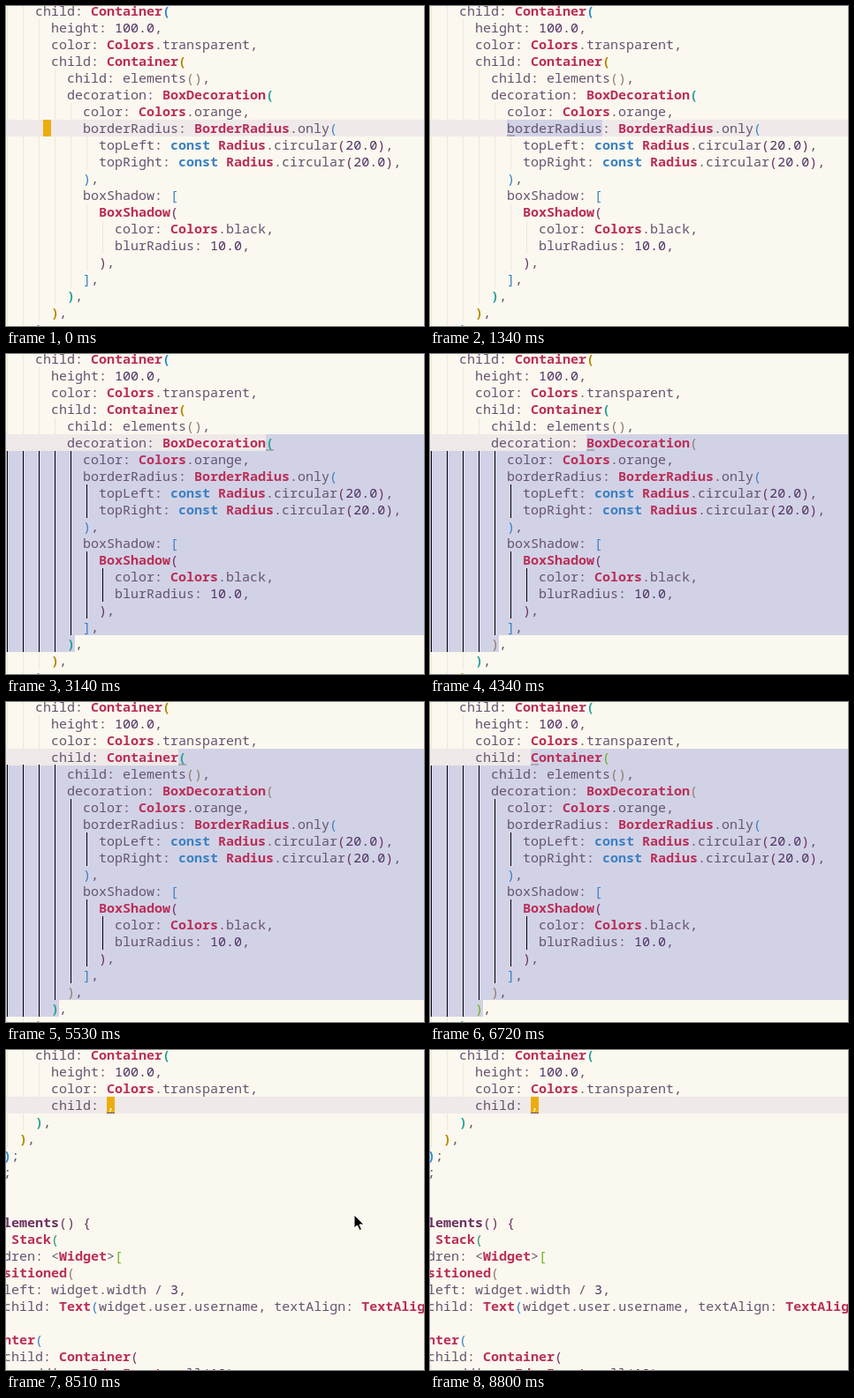
Animation, 473 px wide and 363 px high, one loop 9400 ms. Source, as an HTML page:

```html
<!DOCTYPE html>
<html lang="en">
<head>
<meta charset="utf-8">
<title>Expanding selection in a code editor</title>
<style>
html, body { margin: 0; width: 100%; height: 100%; overflow: hidden; background: #fbf8ef; }
#stage { position: relative; width: 473px; height: 363px; overflow: hidden; background: #fbf8ef; }
#stage div { position: absolute; }
.line { font: 15px/19px "Noto Sans Mono", "Liberation Mono", monospace; height: 19px;
  white-space: pre; color: #655370; font-variant-ligatures: none; }
.type { color: #ba2f59; font-weight: 700; }
.key { color: #3a81c3; font-weight: 700; }
.func { color: #6c3163; font-weight: 700; }
.num { color: #4e3163; }
.hot { font-weight: 700; }
.match { color: #ba2f59; font-weight: 700; text-decoration: underline; }
svg { position: absolute; left: 0; top: 0; }
</style>
</head>
<body>
<div id="stage"></div>
<script>
const LOOP = 9400, W = 473, ROW = 19, TOP = -4;
const HL = "#efeae9", REGION = "#d2d2e6", CURSOR = "#eead0e", BAR = "#a9a9ae", GUIDE = "#efe8d0";
const DEPTH = ["", "#3a81c3", "#6c3163", "#2d9574", "#67b11d", "#8f7a6c", "#3a81c3", "#6c3163"];
const HOT = ["#2aa198", "#b58900", "#268bd2"];

// Each line: left edge of its first character, then text.
const before = { depth: 3, lines: [
  [33, "child: Container("],
  [51, "height: 100.0,"],
  [51, "color: Colors.transparent,"],
  [51, "child: Container("],
  [69, "child: elements(),"],
  [69, "decoration: BoxDecoration("],
  [87, "color: Colors.orange,"],
  [87, "borderRadius: BorderRadius.only("],
  [105, "topLeft: const Radius.circular(20.0),"],
  [105, "topRight: const Radius.circular(20.0),"],
  [87, "),"],
  [87, "boxShadow: ["],
  [105, "BoxShadow("],
  [123, "color: Colors.black,"],
  [123, "blurRadius: 10.0,"],
  [105, "),"],
  [87, "],"],
  [69, "),"],
  [51, "),"],
  [33, "),"]
] };
// The listing above holds one line more than fits between rows 12 and 15.
const after = { depth: 4, lines: [
  ...before.lines.slice(0, 3),
  [51, "child: ,"],
  [33, "),"],
  [15, "),"],
  [-3, ");"],
  [-3, ";"],
  [0, ""],
  [0, ""],
  [-12, "elements() {"],
  [-57, "return Stack("],
  [-39, "children: <Widget>["],
  [-21, "Positioned("],
  [-3, "left: widget.width / 3,"],
  [-3, "child: Text(widget.user.username, textAlign: TextAlign.center),"],
  [0, ""],
  [-21, "Center("],
  [-3, "child: Container("],
  [15, "padding: EdgeInsets.all(10),"]
] };

// sel: [x, row, endX, endRow]; hot: enclosing bracket pairs, innermost first.
const steps = [
  [0, { doc: before, row: 7, block: 42, hot: [3, 1, 0] }],
  [1340, { block: null, sel: [87, 7, 195, 7] }],
  [2090, { sel: [87, 6, 105, 16], stub: true }],
  [2240, { stub: false }],
  [3140, { sel: [294, 5, 78, 17] }],
  [3290, { hot: [1, 0, -1], match: 3 }],
  [3890, { sel: [177, 5, 78, 17], stub: true }],
  [4190, { match: null }],
  [4340, { stub: false }],
  [4630, { sel: [69, 4, 87, 17], stub: true }],
  [4780, { stub: false }],
  [5530, { sel: [195, 3, 60, 18], stub: true }],
  [5680, { stub: false }],
  [5820, { hot: [0, -1, -2], match: 1 }],
  [6270, { sel: [114, 3, 60, 18], stub: true }],
  [6420, { stub: false }],
  [6570, { match: null, stub: true }],
  [6720, { stub: false }],
  [8060, { doc: after, row: 3, sel: null, block: 114 }],
  [8210, { under: true }],
  [8510, { pointer: "arrow" }],
  [8650, { pointer: "beam" }],
  [8800, { pointer: null }]
];
const states = [];
steps.reduce((s, [, change]) => {
  const next = { ...s, ...change };
  states.push(next);
  return next;
}, {});

const POINTERS = {
  arrow: '<path d="M394 187V202L397.5 199L400 204.5L402.5 203.5L400 198H405Z" fill="#000" stroke="#fff"/>',
  beam: '<path d="M428.5 315.5Q431.5 315.5 431.5 318V328Q431.5 330.5 428.5 330.5M434.5 315.5Q431.5 315.5 431.5 318M431.5 328Q431.5 330.5 434.5 330.5" fill="none" stroke="#333"/>'
};

const stage = document.getElementById("stage");
const y = row => TOP + row * ROW;

function rect(x, top, w, h, color) {
  const d = document.createElement("div");
  d.style.cssText = `left:${x}px;top:${top}px;width:${w}px;height:${h}px;background:${color}`;
  stage.append(d);
}

function span(parent, text, cls, color) {
  const s = document.createElement("span");
  s.textContent = text;
  if (cls) s.className = cls;
  if (color) s.style.color = color;
  parent.append(s);
}

function drawGuides(s, first, last) {
  s.doc.lines.forEach(([indent, text], row) => {
    if (row === first || !text) return;
    const dark = s.sel && row > first && row <= last;
    for (let x = -3; x < indent; x += 18) rect(x + 4, y(row), 1, ROW, dark ? "#000" : GUIDE);
  });
  if (s.stub) {
    const indent = s.doc.lines[first + 1][0];
    for (let x = -3; x < indent; x += 18) rect(x + 4, y(first + 1) - 1, 1, 1, "#000");
  }
}

function drawText(s) {
  const open = [-2, -1];
  let id = 0;
  s.doc.lines.forEach(([x, text], row) => {
    const line = document.createElement("div");
    line.className = "line";
    line.style.left = x + "px";
    line.style.top = y(row) + "px";
    const tokens = text.match(/\bconst\b|elements(?=\(\) \{)|\b[A-Z]\w*|\b\d+(?:\.\d+)?|[()[\]{}]|\w+|[^\w()[\]{}]+/g) || [];
    for (const t of tokens) {
      if (/[()[\]{}]/.test(t)) {
        if (/[([{]/.test(t)) open.push(id++);
        const pair = open[open.length - 1];
        const depth = s.doc.depth + open.length - 3;
        const hot = s.hot.indexOf(pair);
        if (/[)\]}]/.test(t)) open.pop();
        if (pair === s.match) span(line, t, "match");
        else if (hot >= 0) span(line, t, "hot", HOT[hot]);
        else span(line, t, "", DEPTH[depth]);
      } else if (t === "const") span(line, t, "key");
      else if (t === "elements" && text.endsWith("{")) span(line, t, "func");
      else if (/^[A-Z]/.test(t)) span(line, t, "type");
      else if (/^\d/.test(t)) span(line, t, "num");
      else if (s.doc === after && row === 3 && t === ": ,") {
        span(line, ": ");
        span(line, ",", "", "#fbf8ef");
      } else span(line, t);
    }
    stage.append(line);
  });
}

function render(s) {
  stage.textContent = "";
  const [x0, first, x1, last] = s.sel || [0, s.row, 0, s.row];
  rect(0, y(first), W, ROW, HL);
  if (s.sel) {
    if (first === last) rect(x0, y(first), x1 - x0, ROW, REGION);
    else {
      rect(x0, y(first), W - x0, ROW, REGION);
      rect(0, y(first + 1), W, (last - first - 1) * ROW, REGION);
      rect(0, y(last), x1, ROW, REGION);
    }
  }
  drawGuides(s, first, last);
  if (s.block != null) rect(s.block, y(s.row), 9, ROW, CURSOR);
  else rect(x0, y(first + 1) - 2, 9, 2, BAR);
  drawText(s);
  if (s.under) rect(s.block, y(s.row + 1) - 1, 9, 1, "#655370");
  if (s.pointer) {
    stage.insertAdjacentHTML("beforeend", `<svg width="473" height="363">${POINTERS[s.pointer]}</svg>`);
  }
}

let shown = -1;
function tick() {
  const t = performance.now() % LOOP;
  let i = steps.length - 1;
  while (steps[i][0] > t) i--;
  if (i !== shown) render(states[shown = i]);
  requestAnimationFrame(tick);
}
tick();
</script>
</body>
</html>
```
